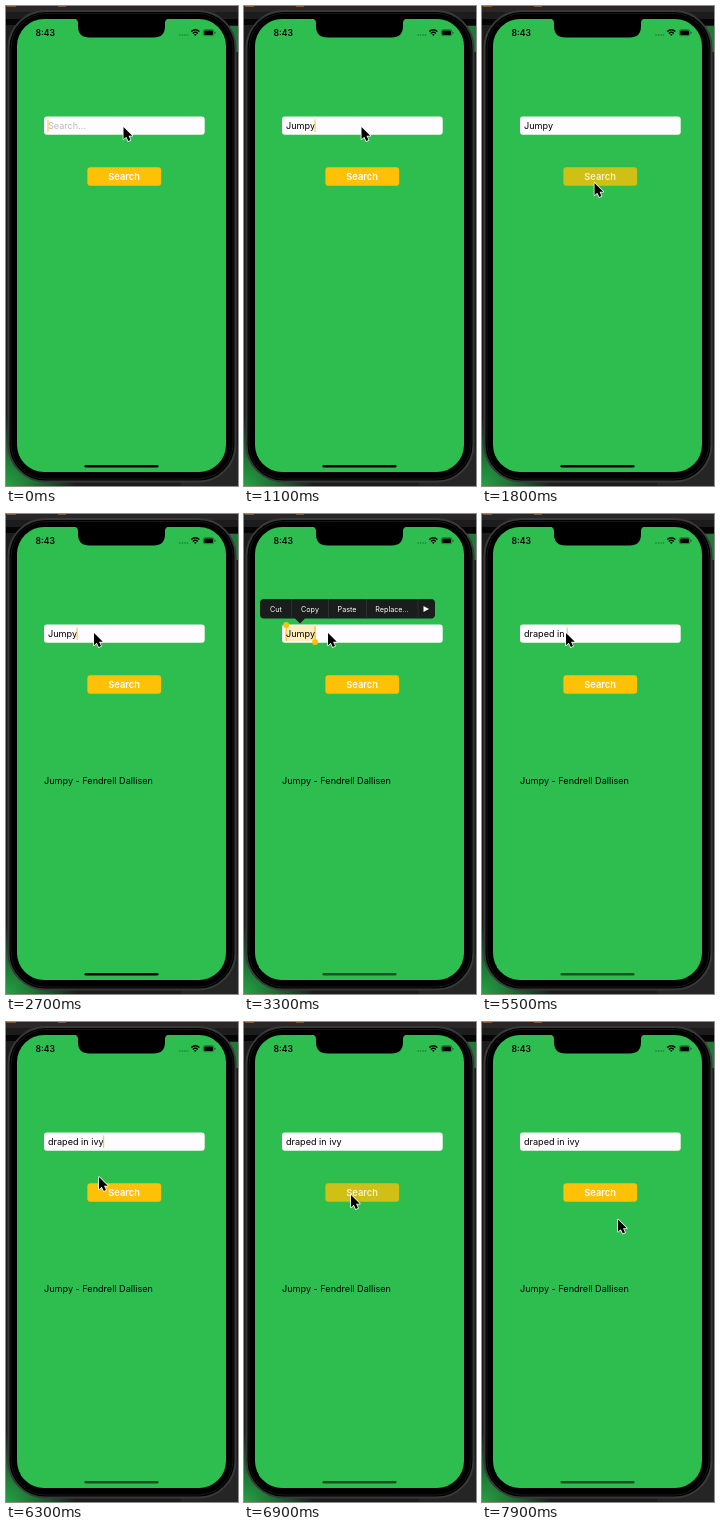
Write an HTML page that moves like this. It is 232 by 480 pixels and loops after 8000 ms.

```html
<!DOCTYPE html>
<html lang="en">
<head>
<meta charset="utf-8">
<title>Song search</title>
<style>
  html, body { margin: 0; width: 100%; height: 100%; overflow: hidden; background: #1c1c1d; }
  svg { display: block; width: 232px; height: 480px; }
  text { font: 9.1px Inter, "Liberation Sans", sans-serif; white-space: pre; }
  .bold { font-weight: 600; }
  .menu text { font-size: 7.2px; fill: #fff; text-anchor: middle; }
</style>
</head>
<body>
<svg viewBox="0 0 232 480">
  <defs>
    <radialGradient id="glow" gradientUnits="userSpaceOnUse" cx="0" cy="480" r="70">
      <stop offset="0" stop-color="#27a045"/>
      <stop offset=".35" stop-color="#1f7a36"/>
      <stop offset="1" stop-color="#1c1c1d"/>
    </radialGradient>
  </defs>

  <!-- desktop behind the phone -->
  <rect width="232" height="480" fill="#1c1c1d"/>
  <rect width="232" height="6" fill="#2b2627"/>
  <path d="M1 0h9v1h-9zM52 0h8v1h-8z" fill="#8a5228"/>
  <path d="M0 13H60V19H0ZM172 13H232V19H172Z" fill="#050505"/>
  <rect x="222" y="20" width="10" height="26" fill="#1f7a36"/>
  <rect y="410" width="70" height="70" fill="url(#glow)"/>
  <rect x="175" y="440" width="57" height="40" fill="#252526"/>

  <!-- phone -->
  <rect x="2.500" y="5" width="227" height="470.500" rx="37" fill="#000" stroke="#39393b" stroke-width="2"/>
  <rect x="5" y="7.500" width="222" height="465.500" rx="35" fill="#000" stroke="#161617"/>
  <rect x="11" y="13" width="209" height="453" rx="27" fill="#2ebe50"/>
  <path d="M68 12.500Q72 13 72 17V20Q72 31.500 83.500 31.500H147.500Q159 31.500 159 20V17Q159 13 163 12.500Z"/>

  <!-- status bar -->
  <text class="bold" x="29.500" y="30" style="font-size:8.600px">8:43</text>
  <g fill="#1c7a35">
    <circle cx="174" cy="29" r=".8"/><circle cx="176.500" cy="29" r=".8"/>
    <circle cx="179" cy="29" r=".8"/><circle cx="181.500" cy="29" r=".8"/>
  </g>
  <path d="M185.200 25.600Q189.300 22 193.400 25.600M186.800 27.400Q189.300 25.200 191.800 27.400" fill="none" stroke="#000" stroke-width="1.300"/>
  <path d="M187.900 28.400Q189.300 27.400 190.700 28.400L189.300 30Z"/>
  <rect x="197.300" y="23.700" width="10.600" height="6" rx="1.800" fill="none" stroke="#16602b" stroke-width=".7"/>
  <rect x="198.200" y="24.500" width="8.800" height="4.400" rx="1"/>
  <rect x="208.500" y="25.700" width="1" height="2" rx=".5" fill="#16602b"/>

  <!-- form -->
  <rect x="38" y="110.500" width="160.700" height="18.300" rx="3" fill="#fefcfe"/>
  <g id="select">
    <rect id="mark" x="42" y="112" width="28" height="15" fill="#ffefbd"/>
    <g fill="#ffbf0a">
      <rect x="41.500" y="111" width="1.200" height="16"/>
      <circle cx="42.200" cy="111" r="2.900"/>
      <g id="grip"><rect x="-.6" y="112" width="1.200" height="16"/><circle cy="128" r="2.900"/></g>
    </g>
  </g>
  <text id="hint" x="42" y="123" fill="#b9b9bc">Search...</text>
  <text id="typed" x="42" y="123"></text>
  <rect id="caret" y="113.500" width="1" height="12.500" fill="#f5c23c"/>
  <rect id="button" x="81.400" y="161.300" width="73.700" height="18.500" rx="3" fill="#fec105"/>
  <text class="bold" id="label" x="118.100" y="174" text-anchor="middle" fill="#fff" style="font-size:9.300px">Search</text>
  <text id="result" x="38" y="270">Jumpy - Fendrell Dallisen</text>

  <!-- edit menu -->
  <g class="menu" id="menu">
    <path d="M20 85H187Q191 85 191 89V100.500Q191 104.500 187 104.500H61L56 109.500L51 104.500H20Q16 104.500 16 100.500V89Q16 85 20 85Z" fill="#191d1b"/>
    <path d="M47.500 85V104.500M84.500 85V104.500M122.500 85V104.500M174 85V104.500" stroke="#343836" stroke-width=".7"/>
    <text x="32" y="97.500">Cut</text>
    <text x="66" y="97.500">Copy</text>
    <text x="103" y="97.500">Paste</text>
    <text x="148" y="97.500">Replace...</text>
    <path d="M179.500 92L185 95L179.500 98Z" fill="#fff"/>
  </g>

  <rect id="home" x="78.500" y="459" width="74" height="2.600" rx="1.300"/>
  <g id="pointer">
    <path d="M0 0V12.200L2.800 9.700L4.800 14.100L7 13.100L5 8.800H8.800Z" stroke="#fff" stroke-width="1.500" stroke-linejoin="round" paint-order="stroke"/>
  </g>
</svg>

<script>
const LOOP = 8000, STEP = 100;
const $ = id => document.getElementById(id);
const during = (t, from, to) => t >= from && t < to;
const show = (id, on) => $(id).style.display = on ? "" : "none";

// pointer stops: time, x, y
const path = [
  [0, 117.5, 121], [1200, 117.5, 121], [1600, 112.5, 177], [2000, 112.5, 177],
  [2500, 88, 119], [2800, 88, 119], [3000, 84, 119], [6000, 84, 119],
  [6300, 93, 155], [6600, 107, 173], [7100, 107, 173], [7600, 136, 197.5], [LOOP, 136, 197.5]
];

const words = [
  { text: "Jumpy", keys: [500, 700, 800, 900, 1100] },
  { text: "draped in ivy", keys: [4300, 4600, 4700, 4800, 4900, 5000, 5100, 5300, 5400, 5500, 5600, 5700, 5900] }
];

function pointerAt(t) {
  const i = path.findIndex(p => p[0] > t);
  const [t0, x0, y0] = path[i - 1], [t1, x1, y1] = path[i];
  const k = (t - t0) / (t1 - t0), e = k * k * (3 - 2 * k);
  return [x0 + (x1 - x0) * e, y0 + (y1 - y0) * e];
}

function typedAt(t) {
  const { text, keys } = words[t < words[1].keys[0] ? 0 : 1];
  return text.slice(0, keys.filter(k => k <= t).length);
}

// press fades the button towards the green beneath it
function pressAt(t, down) {
  if (during(t, down, down + 200)) return 0.78;
  return during(t, down + 200, down + 300) ? 0.9 : 1;
}

function render(t) {
  const text = typedAt(t);
  $("typed").textContent = text;
  const width = text ? $("typed").getComputedTextLength() : 0;
  const selected = during(t, 3100, 4300);

  show("hint", !text);
  show("select", selected);
  show("menu", during(t, 3200, 4200));
  show("result", t >= 2100);
  show("caret", !selected && (t < 1700 || during(t, 2500, 6800)));
  $("caret").setAttribute("x", 41.5 + width);
  $("mark").setAttribute("width", width);
  $("grip").setAttribute("transform", `translate(${42 + width})`);

  const alpha = Math.min(pressAt(t, 1700), pressAt(t, 6800));
  $("button").style.opacity = alpha;
  $("label").style.opacity = alpha;
  $("home").setAttribute("fill", t < 3000 ? "#000" : "#145524");
  $("pointer").setAttribute("transform", `translate(${pointerAt(t)})`);
}

function tick() {
  render(Math.floor(performance.now() % LOOP / STEP) * STEP);
  requestAnimationFrame(tick);
}
tick();
</script>
</body>
</html>
```
